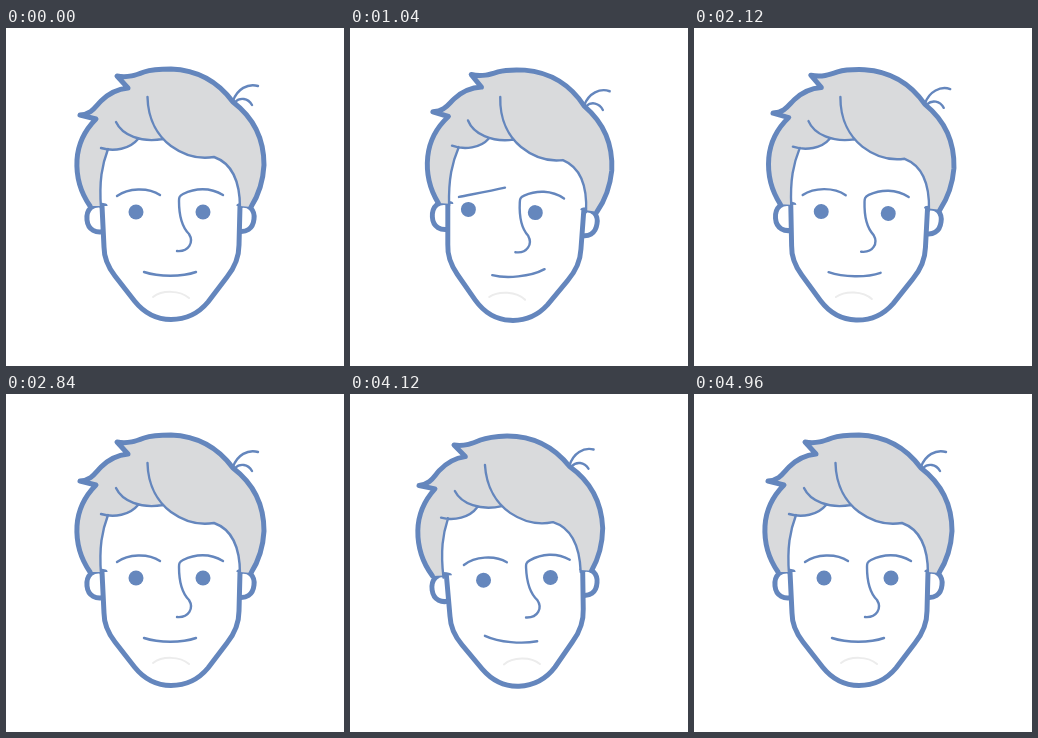
An HTML page that plays this animation: 338x338 px, repeating every 5320 ms.

```html
<!DOCTYPE html>
<html lang="en">
<head>
<meta charset="utf-8">
<title>Tilting head</title>
<style>
  html, body { margin: 0; width: 100%; height: 100%; overflow: hidden; background: #fff; }
  svg { display: block; width: 100vw; height: 100vh; }
  path { fill: none; stroke: #6486bd; stroke-linecap: round; stroke-linejoin: round; }
  .bold { stroke-width: 5; }
  .thin { stroke-width: 2.4; }
  .skin { fill: #fff; }
  .hair { fill: #d9dadc; stroke: none; }
  .chin { stroke: #ececec; stroke-width: 2; }
  circle { fill: #6587bd; }
</style>
</head>
<body>
<svg viewBox="0 0 338 338">
  <g id="jaw">
    <path class="bold skin" d="M99 178C86 174 80 182 81 192C82 202 90 206 100 203"/>
    <path class="bold skin" d="M233 178C244 175 249 183 248 191C247 201 240 205 231 203"/>
    <path class="bold skin" d="M96 178L98 219C98 231 102 239 109 248L128.500 273C139 286 151 291.500 165 291.500C179 291.500 192 286 202 274L221 249C229 239 233 230 233 217L234 178"/>
  </g>
  <g id="hair">
    <path class="hair" d="M84 178C75 165 70 150 71 132C72 115 79 102 90 91L74 87C86 86 89 79 95 73C103 65 112 61 122 60L111 48C122 50 130 47 138 44C147 41 157 41 165 41C192 42 213 55 227 74C248 90 258 111 258 137C257 155 252 168 245 179L234 178C234 152 225 135 208 129C190 132 176 126 165 118L157 111C148 113 140 113 132 111C124 119 113 122 102 121C96 137 93 153 95 178Z"/>
    <path class="bold" d="M84 178C75 165 70 150 71 132C72 115 79 102 90 91L74 87C86 86 89 79 95 73C103 65 112 61 122 60L111 48C122 50 130 47 138 44C147 41 157 41 165 41C192 42 213 55 227 74C248 90 258 111 258 137C257 155 252 168 245 179"/>
    <path class="thin" d="M95 180C93 153 96 137 102 121M95 120C108 124 124 121 132 111M110 94C116 107 135 115 157 111M141.500 69C142 93 153 109 165 118C176 126 190 132 208 129C225 135 234 152 234 180"/>
    <path class="thin" d="M227 73C231 61 242 55 252 58M229 74C234 69 242 70 246 77"/>
  </g>
  <g id="face">
    <path id="brow" class="thin"/>
    <path id="nose" class="thin"/>
    <path id="mouth" class="thin"/>
    <path class="chin" d="M147 269C156 262 174 262 183 270"/>
    <g id="eyes"><circle cx="130" cy="184" r="7.5"/><circle cx="197" cy="184" r="7.5"/></g>
  </g>
</svg>
<script>
const LOOP = 5320, STEP = 40;
const el = id => document.getElementById(id);

// each feature: neutral, glancing left, glancing right
const shapes = {
  brow: [
    'M111 168C122 160 142 159 154 167',
    'M112 170.5C126 167 143 163 157.5 159',
    'M111 169C122 159 142 158 154 167'
  ],
  nose: [
    'M217 167C204 159 189 160 177 166C173 168 173 170 173 173C173 191 177 200 183 206C188 214 183 224 171 223',
    'M217 167C204 159 189 160 177 166C173 168 173 170 173 173C173 191 177 200 183 206C188 214 183 224 171 223',
    'M215 171C200 167.5 187 163.5 174 160C172 159.5 170 159 170 159C172 180 178 200 184 206C189 214 184 224 172 222.5'
  ],
  mouth: [
    'M138 244C153 249 176 249 190 244',
    'M149 247C163 250 187 247 201 238.5',
    'M128 239C142 246.5 165 249.5 180 247.5'
  ]
};

const nums = d => d.match(/[\d.]+/g).map(Number);
const parts = Object.entries(shapes).map(([id, ds]) => ({ id, base: ds[0], sets: ds.map(nums) }));

const ease = (t, a, b) => {
  const p = Math.min(1, Math.max(0, (t - a) / (b - a)));
  return p * p * (3 - 2 * p);
};
// rises from a to b, falls from c to d
const swell = (t, a, b, c, d) => ease(t, a, b) - ease(t, c, d);

function morph({ id, base, sets }, left, right) {
  const [n, l, r] = sets;
  let i = 0;
  el(id).setAttribute('d', base.replace(/[\d.]+/g, () => {
    const v = n[i] + left * (l[i] - n[i]) + right * (r[i] - n[i]);
    i++;
    return v.toFixed(2) + ' ';
  }));
}

// nearer layers slide further as the head turns
function pose(group, tilt, turn, depth, squash) {
  const amount = Math.abs(turn);
  el(group).setAttribute('transform',
    `translate(${165 - depth * turn} ${290 + amount}) rotate(${tilt}) ` +
    `scale(${1 - squash * amount} 1) translate(-165 -290)`);
}

function draw(t) {
  const tilt = 4.4 * swell(t, 500, 1420, 1420, 2600) - 3.3 * swell(t, 2880, 3500, 3840, 4600);
  const turn = Math.sin(tilt / 4.4 * Math.PI / 2);
  const lookL = swell(t, 400, 900, 1500, 2120);
  const lookR = swell(t, 2880, 3300, 3860, 4120);
  const smirkL = swell(t, 440, 1000, 1600, 2240);
  const smirkR = swell(t, 2880, 3320, 4000, 4560);

  pose('hair', tilt, turn, 2.7, 0.016);
  pose('jaw', tilt, turn, 5.5, 0.016);
  pose('face', tilt, turn, 10.6, 0);
  for (const part of parts) {
    if (part.id === 'mouth') morph(part, smirkL, smirkR);
    else morph(part, lookL, lookR);
  }
  el('eyes').setAttribute('transform', `translate(${9.5 * lookR - 8 * lookL} ${-1.5 * lookL - lookR * 0.5})`);
}

const start = performance.now();
function tick() {
  const t = (performance.now() - start) % LOOP;
  draw(Math.floor(t / STEP) * STEP);
  requestAnimationFrame(tick);
}
tick();
</script>
</body>
</html>
```
